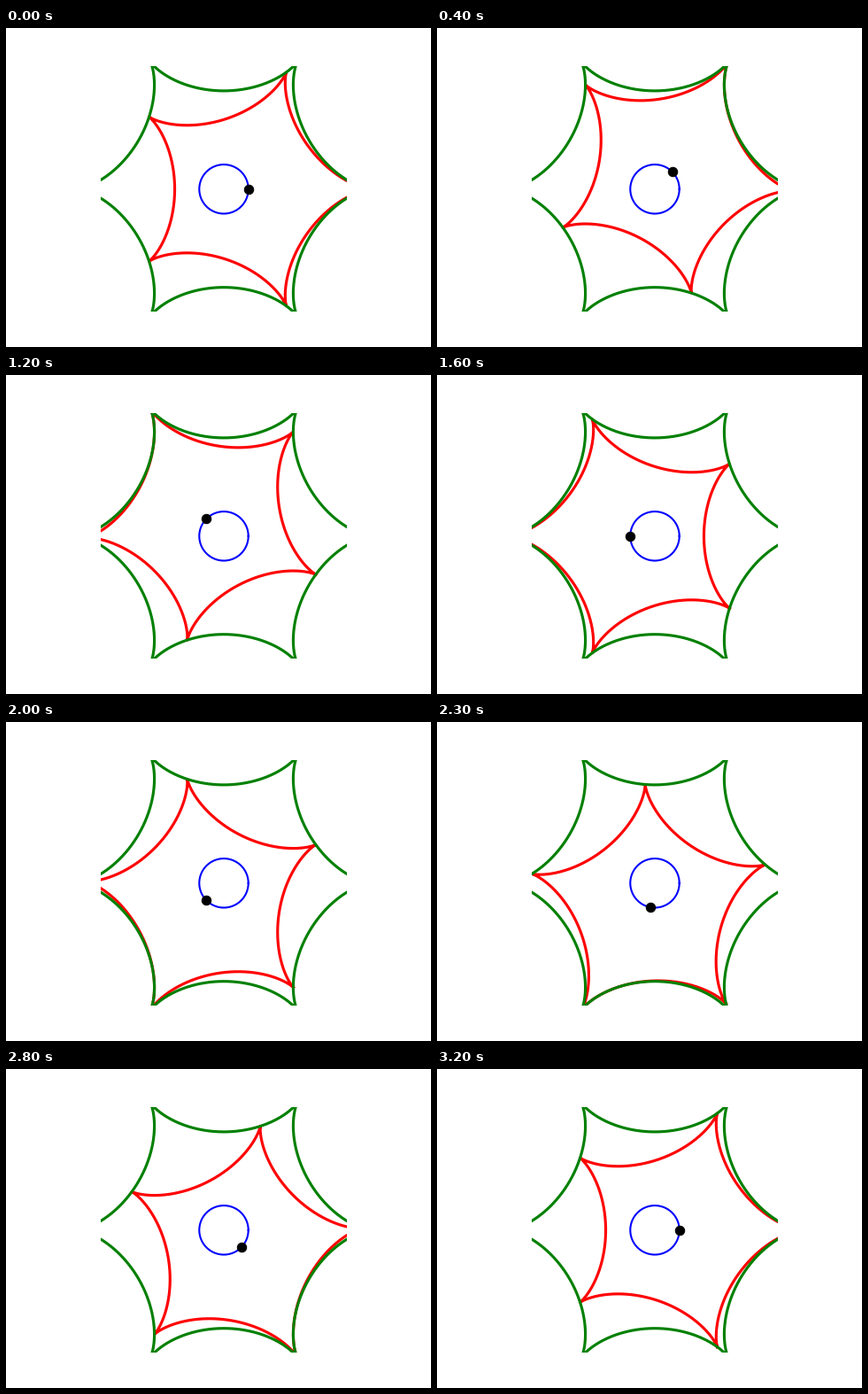
A matplotlib script that plays this animation: 480 px wide and 360 px high, repeating every 3.3 s.

```python
import numpy as np
import matplotlib.pyplot as plt
from matplotlib.animation import FuncAnimation

FRAMES = 33
INTERVAL = 100

t = np.linspace(0, 2 * np.pi, 1000)


def hypocycloid(n):
    """Curve with n cusps traced by a unit circle rolling in radius n."""
    return ((n - 1) * np.cos(t) + np.cos((n - 1) * t),
            (n - 1) * np.sin(t) - np.sin((n - 1) * t))


inner_x, inner_y = hypocycloid(5)

fig, ax = plt.subplots(figsize=(6.4, 4.8), dpi=75)
ax.set_aspect("equal")
ax.set_xlim(-5, 5)
ax.set_ylim(-5, 5)
ax.axis("off")

rolling, = ax.plot([], [], color="red", lw=3)
ax.plot(*hypocycloid(6), color="green", lw=3)
ax.plot(np.cos(t), np.sin(t), color="blue", lw=2)
dot, = ax.plot([], [], "o", color="black", ms=10)


def update(i):
    # The last frame completes the turn and coincides with the first.
    a = 2 * np.pi * i / (FRAMES - 1)
    cx, cy = np.cos(a), np.sin(a)
    c, s = np.cos(-a / 5), np.sin(-a / 5)
    rolling.set_data(cx + c * inner_x - s * inner_y,
                     cy + s * inner_x + c * inner_y)
    dot.set_data([cx], [cy])
    return rolling, dot


anim = FuncAnimation(fig, update, frames=FRAMES, interval=INTERVAL,
                     repeat=True, repeat_delay=0)
plt.show()
```
